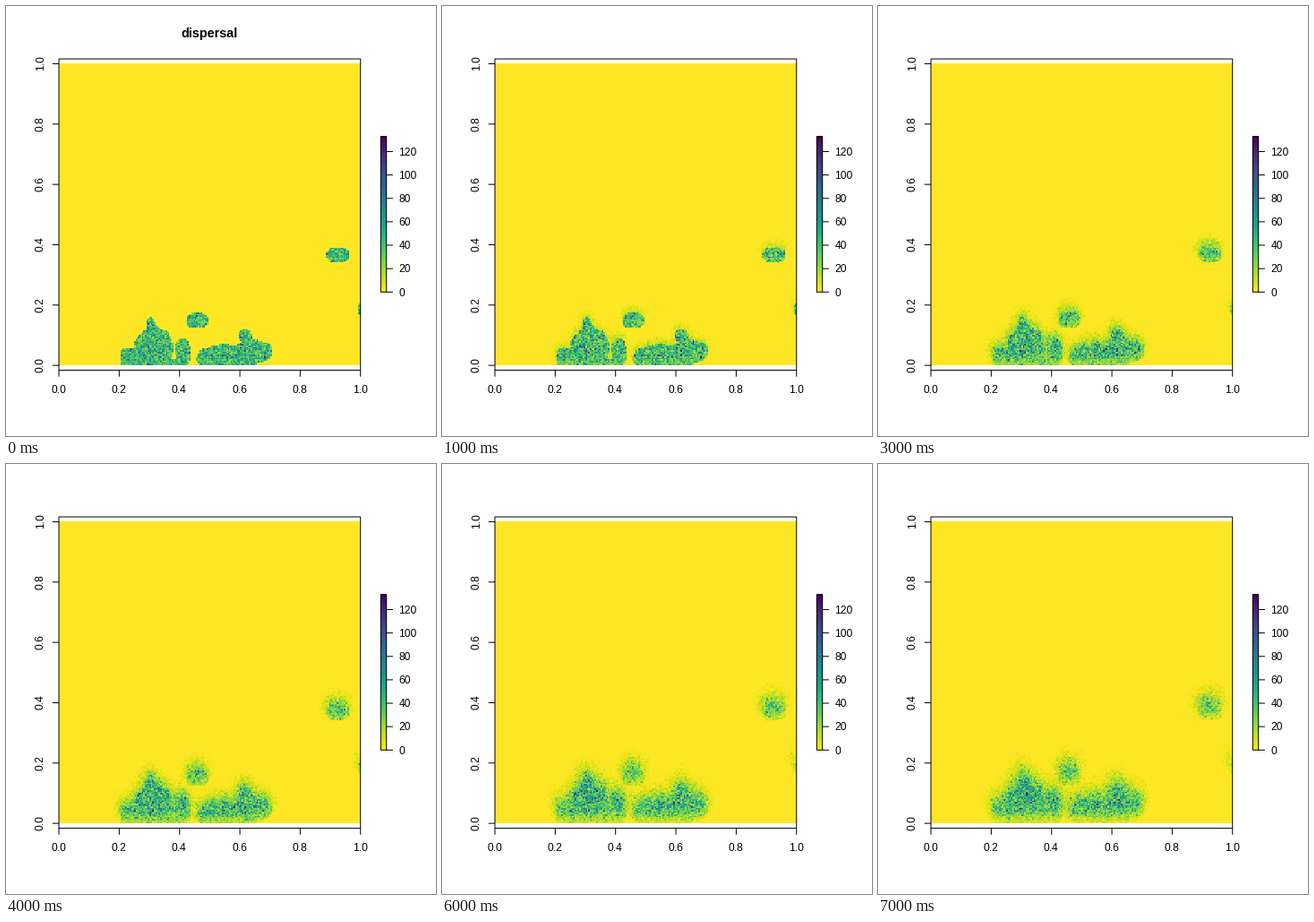
Recreate the animation shown at these times as a matplotlib script. Size 480 by 480 pixels, loop 8000 ms.

```python
import numpy as np
import matplotlib.pyplot as plt
from matplotlib.animation import FuncAnimation
from matplotlib.patches import Rectangle

SIZE, DPI = 480, 72
STEPS, INTERVAL = 8, 1000
N = 200                                   # cells per side
LINE = 14.4                               # height of one margin line
LEFT, BOX_TOP, BOX_BOTTOM = 4.1 * LINE, 4.1 * LINE, SIZE - 5.1 * LINE
SIDE = 336.7                              # raster width and height
MID = (BOX_TOP + BOX_BOTTOM) / 2
TOP, BOTTOM = MID - SIDE / 2, MID + SIDE / 2
RIGHT = LEFT + SIDE
BAR_LEFT, BAR_RIGHT, BAR_TOP, BAR_BOTTOM = 418.3, 424.7, 146, 319.3
VMAX = 132.6
UP, SPREAD, MOVE, GROWTH = 3.0, 2.1, 0.28, 1.02   # dispersal, in cells

plt.rcParams["font.family"] = "Liberation Sans"
rng = np.random.default_rng(11)

# Starting patches as blobs: centre x, y and radii, in stage pixels
BLOBS = [
    (146, 395, 21, 14), (165, 382, 21, 23), (161, 356, 5, 9),
    (197, 386, 8, 17), (190, 398, 9, 4), (214, 351, 12, 9),
    (222, 394, 8, 11), (250, 392, 36, 13), (276, 386, 21, 13),
    (267, 369, 7, 8), (370, 278, 12, 9), (397, 339, 5, 8),
]


def kernel(shift):
    """Matrix that blurs one axis and moves it towards lower indices."""
    i = np.arange(N)
    d = i[:, None] - i[None, :] + shift
    return np.exp(-0.5 * (d / SPREAD) ** 2) / (SPREAD * np.sqrt(2 * np.pi))


def start_mask():
    centres = (np.arange(N) + 0.5) * SIDE / N
    x, y = np.meshgrid(LEFT + centres, TOP + centres)
    blur = kernel(0)
    edge = 1 + 0.8 * (blur @ rng.normal(size=(N, N)) @ blur.T)
    inside = np.zeros((N, N), bool)
    for cx, cy, rx, ry in BLOBS:
        inside |= np.abs((x - cx) / rx) ** 2.5 + np.abs((y - cy) / ry) ** 2.5 < edge
    return inside.astype(float)


def long_jumps(density, count=3):
    """A few individuals land far from where they started."""
    sources = np.argwhere(density > 20)
    for row, col in rng.choice(sources, count):
        row += int(rng.normal(-10, 8))
        col += int(rng.normal(0, 8))
        density[np.clip(row, 0, N - 1), np.clip(col, 0, N - 1)] += 5


def simulate():
    rise, side = kernel(UP), kernel(0.3).T
    density = 45 * start_mask()
    grain = rng.normal(size=(N, N))
    fields = []
    for step in range(STEPS):
        if step:
            density = (1 - MOVE) * density + MOVE * (rise @ density @ side)
            density *= GROWTH
            long_jumps(density)
            grain = 0.8 * grain + 0.6 * rng.normal(size=(N, N))
        sd = 0.42 if step else 0.34
        fields.append(rng.poisson(density * np.exp(sd * grain - sd * sd / 2)))
    return fields


fields = simulate()

fig = plt.figure(figsize=(SIZE / DPI, SIZE / DPI), dpi=DPI, facecolor="white")
ax = fig.add_axes([0, 0, 1, 1])
ax.axis("off")


def raster(data, x0, x1, y0, y1):
    return ax.imshow(data, cmap="viridis_r", vmin=0, vmax=VMAX,
                     extent=(x0, x1, y1, y0), interpolation="nearest",
                     aspect="auto", zorder=1)


def line(x0, y0, x1, y1):
    ax.plot([x0, x1], [y0, y1], color="black", lw=1, snap=False,
            solid_capstyle="butt", zorder=3)


def frame(x0, x1, y0, y1):
    ax.add_patch(Rectangle((x0, y0), x1 - x0, y1 - y0, fill=False, ec="black",
                           lw=1, snap=False, joinstyle="miter", zorder=3))


def label(x, y, text, **kw):
    kw = {"fontsize": 12, "ha": "center", "va": "baseline", **kw}
    return ax.text(x, y, text, color="black", **kw)


image = raster(fields[0], LEFT, RIGHT, TOP, BOTTOM)
raster(np.linspace(VMAX, 0, 255)[:, None], BAR_LEFT, BAR_RIGHT, BAR_TOP, BAR_BOTTOM)
frame(LEFT, RIGHT, BOX_TOP, BOX_BOTTOM)
frame(BAR_LEFT, BAR_RIGHT, BAR_TOP, BAR_BOTTOM)

for part in np.linspace(0, 1, 6):
    x, y = LEFT + part * SIDE, BOTTOM - part * SIDE
    line(x, BOX_BOTTOM, x, BOX_BOTTOM + LINE / 2)
    line(LEFT, y, LEFT - LINE / 2, y)
    label(x - 0.4, 432, f"{part:.1f}")
    label(42, y - 0.6, f"{part:.1f}", rotation=90, rotation_mode="anchor")

for value in range(0, 121, 20):
    y = BAR_BOTTOM - value / VMAX * (BAR_BOTTOM - BAR_TOP)
    line(BAR_RIGHT, y, BAR_RIGHT + LINE / 2, y)
    label(438.4, y + 4.2, str(value), ha="left")

title = label((LEFT + RIGHT) / 2 - 0.4, 35, "dispersal", fontsize=14.4, weight="bold")
ax.set(xlim=(0, SIZE), ylim=(SIZE, 0))


def update(step):
    image.set_data(fields[step])
    title.set_visible(step == 0)
    return image, title


anim = FuncAnimation(fig, update, frames=STEPS, interval=INTERVAL,
                     init_func=lambda: update(0), repeat=True, repeat_delay=0)
plt.show()
```
